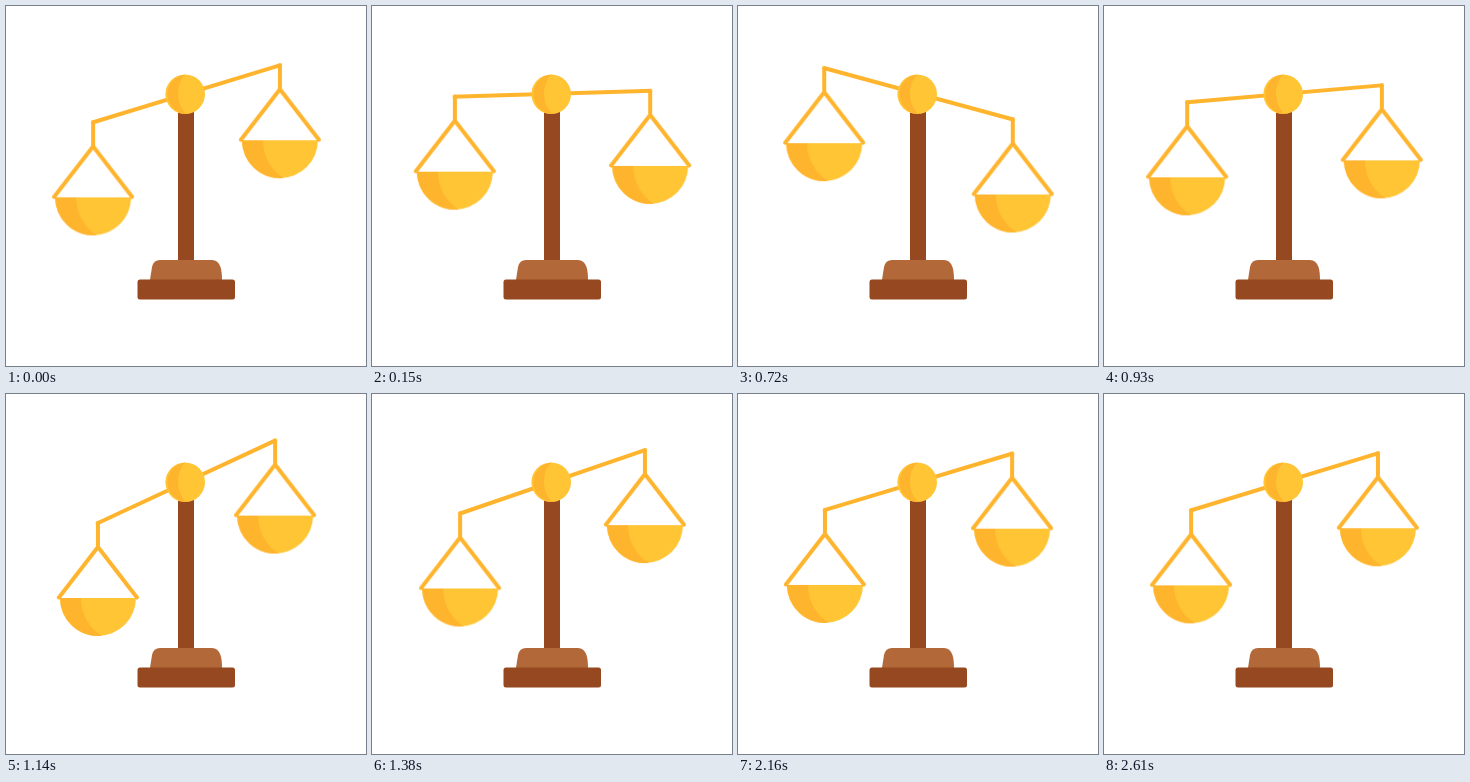
These frames come from a looping animation (360x360 px, 3670 ms). An HTML page without scripts:

```html
<!DOCTYPE html>
<html lang="en">
<head>
<meta charset="utf-8">
<title>Balance scale</title>
<style>
  html, body { margin: 0; width: 100%; height: 100%; overflow: hidden; background: #fff; }
  svg { display: block; width: 100%; height: 100%; }

  .swing, .level {
    --dir: 1;
    transform-origin: 0 0;
    animation: swing 3670ms infinite;
  }
  /* pans turn against the beam to hang upright */
  .level { --dir: -1; }

  @keyframes swing {
    0% {
      transform: rotate(calc(var(--dir) * -17deg));
      animation-timing-function: cubic-bezier(.3, 0, .35, 1);
    }
    12.81% {
      transform: rotate(calc(var(--dir) * 20.7deg));
      animation-timing-function: cubic-bezier(.7, 0, .66, 1);
    }
    31.74% {
      transform: rotate(calc(var(--dir) * -25.1deg));
      animation-timing-function: cubic-bezier(.37, 0, .63, 1);
    }
    43.73% {
      transform: rotate(calc(var(--dir) * -12.4deg));
      animation-timing-function: cubic-bezier(.37, 0, .63, 1);
    }
    53.81% {
      transform: rotate(calc(var(--dir) * -19deg));
      animation-timing-function: cubic-bezier(.37, 0, .63, 1);
    }
    62.67% {
      transform: rotate(calc(var(--dir) * -15.3deg));
      animation-timing-function: cubic-bezier(.37, 0, .63, 1);
    }
    71.12%, 100% { transform: rotate(calc(var(--dir) * -17deg)); }
  }

  .line { fill: none; stroke: #ffb42e; stroke-width: 4; stroke-linecap: round; stroke-linejoin: round; }
  .gold { fill: #ffc535; }
  .shade { fill: #ffb42e; }
  .wood { fill: #964921; }
  .step { fill: #b26838; }
</style>
</head>
<body>
<svg viewBox="0 0 360 360">
  <defs>
    <g id="pan">
      <path class="gold" d="M-38 75a38 38 0 0 0 76 0z"/>
      <path class="shade" d="M-38 75A38 38 0 0 0 4 112.8C-8 106-17 92-17 75z"/>
      <path class="line" d="M0 0V24M-39 74.5L0 24L39 74.5"/>
    </g>
  </defs>

  <rect class="wood" x="172" y="100" width="16" height="155"/>
  <path class="step" d="M144 274L146 261Q147.500 254 154 254H206Q212 254 214.500 261Q216 266 216 274z"/>
  <rect class="wood" x="131.500" y="273.500" width="97.500" height="20" rx="2.500"/>

  <g transform="translate(180.500 87.800)">
    <g class="swing">
      <path class="line" d="M-97.700 0H97.700"/>
      <g transform="translate(-97.700 0)"><g class="level"><use href="#pan"/></g></g>
      <g transform="translate(97.700 0)"><g class="level"><use href="#pan"/></g></g>
    </g>
  </g>

  <circle class="gold" cx="179.200" cy="88.200" r="19.800"/>
  <path class="shade" d="M179.200 68.400A19.800 19.800 0 0 0 181 107.900C171 101 168 80 179.200 68.400z"/>
</svg>
</body>
</html>
```
